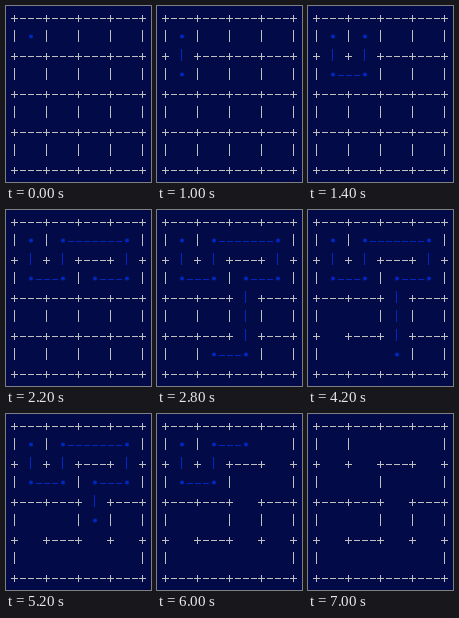
Recreate the animation shown at these times as an HTML page. Size 145 by 176 pixels, loop 9 s.

```html
<!DOCTYPE html>
<html lang="en">
<head>
<meta charset="utf-8">
<title>Maze by backtracking</title>
<style>
  html, body { margin: 0; width: 100%; height: 100%; overflow: hidden; background: #020a48; }
  svg { display: block; width: 100%; height: 100%; }
  path { fill: none; stroke-width: 1; }
  #walls { stroke: #c0c0c0; }
  #trail { stroke: #0226c0; }
  #dots { fill: #0226c0; stroke: none; }
</style>
</head>
<body>
<svg viewBox="0 0 145 176">
  <path id="walls"/>
  <path id="trail"/>
  <path id="dots"/>
</svg>
<script>
const SIZE = 4, LOOP = 9000, START = 1000, STEP = 200;
// U, D, L, R carve a passage; B steps back
const MOVES = 'DRURRDLDDLLUR' + 'BBBB' + 'RU' + 'B'.repeat(11);
const DIRS = { U: [0, -1], D: [0, 1], L: [-1, 0], R: [1, 0] };
const $ = id => document.getElementById(id);

// Character cells are 8 by 19; one maze cell is 4 columns by 2 rows.
const colX = col => 5 + col * 8;
const rowY = row => 3 + row * 19;
const dash = (col, row) => `M${colX(col) + 1} ${rowY(row) + 9.5}h6`;
const bar = (col, row) => `M${colX(col) + 3.5} ${rowY(row) + 2}v12`;
const plus = (col, row) => `M${colX(col)} ${rowY(row) + 9.5}h7m-3.5 -3.5v7`;
const dot = (col, row) =>
  `M${colX(col) + 2} ${rowY(row) + 8.5}a2 2 0 1 1 4 0a2 2 0 1 1 -4 0z`;
const dashes = (col, row) => [-1, 0, 1].map(i => dash(col + i, row)).join('');

const place = ([x, y]) => [2 + 4 * x, 1 + 2 * y];
const middle = (a, b) => place([(a[0] + b[0]) / 2, (a[1] + b[1]) / 2]);

function mazeAt(n) {
  const path = [[0, 0]], open = new Set();
  for (const m of MOVES.slice(0, n)) {
    if (m === 'B') { path.pop(); continue; }
    const from = path[path.length - 1];
    const to = from.map((v, i) => v + DIRS[m][i]);
    open.add(middle(from, to).join());
    path.push(to);
  }
  return { path: n > MOVES.length ? [] : path, open };
}

function wallPath(open) {
  let d = '';
  for (let y = 0; y <= SIZE; y++) {
    for (let x = 0; x <= SIZE; x++) {
      const col = 4 * x, row = 2 * y;
      d += plus(col, row);
      if (x < SIZE && !open.has([col + 2, row].join())) d += dashes(col + 2, row);
      if (y < SIZE && !open.has([col, row + 1].join())) d += bar(col, row + 1);
    }
  }
  return d;
}

function draw(n) {
  const { path, open } = mazeAt(n);
  let trail = '', dots = '';
  path.forEach((cell, i) => {
    const prev = path[i - 1], next = path[i + 1], at = place(cell);
    if (prev && next && prev[1] === next[1]) trail += dash(...at);
    else if (prev && next && prev[0] === next[0]) trail += bar(...at);
    else dots += dot(...at);
    if (next) trail += (next[1] === cell[1] ? dashes : bar)(...middle(cell, next));
  });
  $('walls').setAttribute('d', wallPath(open));
  $('trail').setAttribute('d', trail);
  $('dots').setAttribute('d', dots);
}

let shown = -1;
const begin = performance.now();
function frame() {
  const t = (performance.now() - begin) % LOOP;
  const n = t < START ? 0 : Math.min(Math.floor((t - START) / STEP) + 1, MOVES.length + 1);
  if (n !== shown) draw(shown = n);
  requestAnimationFrame(frame);
}
frame();
</script>
</body>
</html>
```
